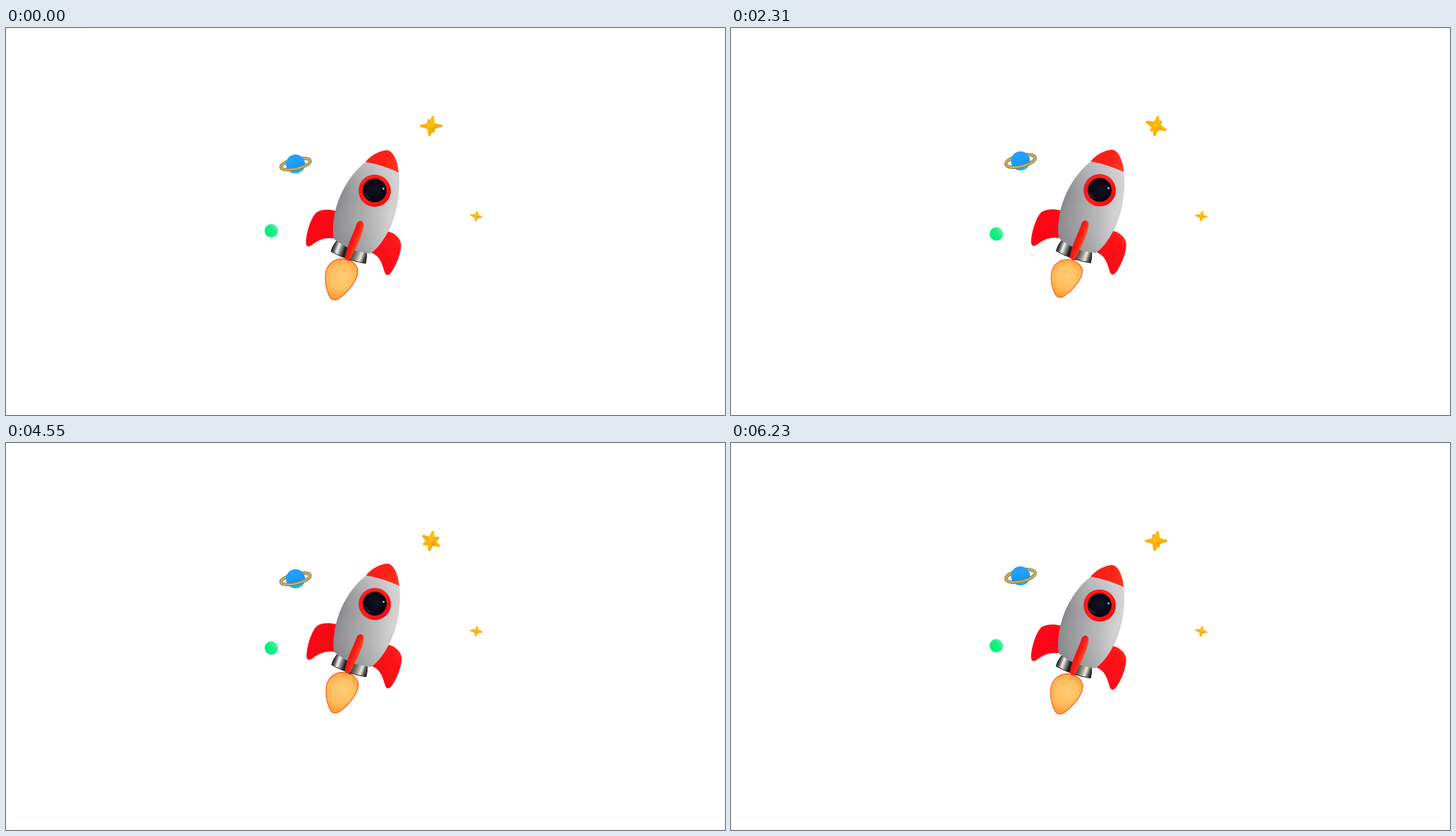
Write an HTML page with a canvas that moves like this. It is 1020 by 549 pixels and loops after 6.3 s.

```html
<!DOCTYPE html>
<html lang="en">
<head>
<meta charset="utf-8">
<title>Rocket</title>
<style>
html, body { margin: 0; width: 100%; height: 100%; overflow: hidden; background: #fff; }
canvas { display: block; width: 1020px; height: 549px; }
</style>
</head>
<body>
<canvas id="stage"></canvas>
<script>
const W = 1020, H = 549, LOOP = 6300, STEP = 70;
const TAU = Math.PI * 2;
const canvas = document.getElementById('stage');
const ratio = window.devicePixelRatio || 1;
canvas.width = W * ratio;
canvas.height = H * ratio;
const ctx = canvas.getContext('2d');

const shapes = {
  body: new Path2D('M510.5 190 C488 207 471 237 466 265 C463.500 280 463 291 465 299 C480 311 497 318 517 320 C532 309 545 288 552 263 C558 241 559 222 557 204 Q535 194 510.500 190 Z'),
  nose: new Path2D('M510 190 C516 182 528 174.500 540 173.300 C550 174.500 556 190 557 205 Q535 194.500 510 190 Z'),
  leftFin: new Path2D('M468 259.500 C458 257 447 257 440 262 C432 270 426 291 425.500 304 C425.500 310 429 311 433 308.500 C443 301 452 296 468 299 Z'),
  rightFin: new Path2D('M542 288.500 C552 291 561 299 560.500 309 C560 321 553 338 545.500 348 C542 352 538.500 351 537 346 C533 333 531 324 517 318 Z'),
  nozzle: new Path2D('M469 302 Q463 309 461 317 Q484 330 510 334 Q512 327 511.500 318 Z'),
  frontFin: new Path2D('M496.5 281 C498 271.500 507.500 271.500 507.300 280 C506.500 293 496 313 489.500 326 C487 331 480.500 330 481 325 C483 311 491 295 496.500 281 Z'),
  flame: new Path2D('M478 327.500 C491 328 500 337 499 347 C498 359 484 376 472 384 C466 388 461 386 458 379 C454 370 452 358 453.500 347 C456 335 465 327 478 327.500 Z')
};

function stops(g, list) {
  list.forEach(([p, c]) => g.addColorStop(p, c));
  return g;
}
const linear = (x0, y0, x1, y1, list) => stops(ctx.createLinearGradient(x0, y0, x1, y1), list);
const radial = (x0, y0, x1, y1, r, list) => stops(ctx.createRadialGradient(x0, y0, 0, x1, y1, r), list);

function fill(path, style) {
  ctx.fillStyle = style;
  ctx.fill(path);
}

function disc(x, y, r, style) {
  ctx.beginPath();
  ctx.arc(x, y, r, 0, TAU);
  ctx.fillStyle = style;
  ctx.fill();
}

function layer(x, y, draw) {
  ctx.save();
  ctx.translate(x, y);
  draw();
  ctx.restore();
}

// 0 at the start of a period, 1 in its middle
const swing = (t, period, delay = 0) => (1 - Math.cos(TAU * (t - delay) / period)) / 2;

function drawFlame(t) {
  const s = 1.005 - 0.1 * swing(t, 630, 50);
  ctx.save();
  ctx.translate(476, 349);
  ctx.scale((1 + s) / 2, s);
  ctx.translate(-476, -349);
  fill(shapes.flame, radial(478, 352, 474, 356, 36, [
    [0, '#ffcc74'], [0.45, '#ffc062'], [0.7, '#ffab48'], [0.88, '#ff942c'], [1, '#ff781c']]));
  ctx.strokeStyle = '#ff5a14';
  ctx.lineWidth = 1.2;
  ctx.stroke(shapes.flame);
  ctx.restore();
}

function drawWindow() {
  disc(523, 231, 22.9, linear(505, 216, 541, 246, [[0, '#f5141a'], [0.5, '#ff1c18'], [1, '#e90d12']]));
  ctx.beginPath();
  ctx.arc(523, 231, 20.5, 3.6, 5.6);
  ctx.strokeStyle = 'rgba(255,70,45,.45)';
  ctx.lineWidth = 1.5;
  ctx.stroke();
  disc(523, 230.5, 16.8, radial(525, 228, 523, 230.5, 17, [[0, '#12142a'], [0.7, '#080916'], [1, '#020208']]));
  disc(535.5, 228, 1.4, '#c8cce0');
  for (let i = 0; i < 5; i++) disc(509.5 + i * 1.5, 235.5 + i * 1.7, 0.5, '#a9a9b8');
}

// Hinged at its top, so the foot lags as the rocket turns
function drawFrontFin(k) {
  layer(502, 277, () => {
    ctx.rotate(0.045 * k);
    ctx.translate(-502, -277);
    fill(shapes.frontFin, linear(489, 298, 502, 303, [[0, '#f30c14'], [0.45, '#ff1c14'], [0.75, '#fb4220'], [1, '#ee5a2c']]));
  });
}

function drawRocket(t) {
  const k = swing(t, 2100, 50);
  layer(4.5 * k, -12.4 * k, () => {
    drawFlame(t);
    layer(4 * k, 3 * k, () => disc(486, 326, 4, '#f5161a'));

    fill(shapes.nozzle, linear(463, 308, 513, 326, [
      [0, '#161616'], [0.08, '#555'], [0.17, '#f4f4f4'], [0.27, '#777'], [0.36, '#1c1c1c'], [0.55, '#35342f'],
      [0.7, '#8c8a7c'], [0.82, '#eceade'], [0.91, '#5a5950'], [1, '#111']]));
    ctx.strokeStyle = '#222';
    ctx.lineWidth = 1;
    ctx.stroke(shapes.nozzle);

    fill(shapes.leftFin, linear(440, 258, 452, 306, [[0, '#fa0e16'], [0.3, '#ff0414'], [1, '#ff0414']]));
    fill(shapes.rightFin, linear(560, 300, 524, 325, [[0, '#ff261a'], [0.3, '#ff1218'], [1, '#fa0c16']]));

    fill(shapes.body, linear(470, 240, 558, 268, [
      [0, '#7c7c81'], [0.12, '#8f8f93'], [0.38, '#a6a6a9'], [0.64, '#bdbdbf'], [0.87, '#d8d6d4'], [1, '#d2cdc6']]));
    fill(shapes.body, linear(534, 197, 492, 316, [
      [0, 'rgba(225,225,225,.5)'], [0.45, 'rgba(190,190,190,.1)'], [1, 'rgba(112,112,115,.4)']]));
    fill(shapes.nose, linear(518, 182, 556, 196, [[0, '#f5201c'], [0.55, '#ff2116'], [1, '#f63a20']]));

    layer(-3.6 * k, -1.4 * k, () => {
      drawWindow();
      drawFrontFin(k);
    });
  });
}

function drawPlanet(t) {
  const k = swing(t, 4200);
  const ry = 6.7 + 1.2 * k;
  const ring = (from, to) => {
    [['#85773f', 4.6], ['#ac9a58', 3.2], ['#cfbd7a', 1.2]].forEach(([color, width]) => {
      ctx.beginPath();
      ctx.ellipse(0, 0, 21.2, ry, -0.23, from, to);
      ctx.strokeStyle = color;
      ctx.lineWidth = width;
      ctx.stroke();
    });
  };
  layer(410.7, 193 - 4.5 * k, () => {
    ring(Math.PI, TAU);
    disc(0, 0, 13.6, linear(-4, -13, 4, 13, [
      [0, '#2a9cfa'], [0.3, '#22a0ff'], [0.65, '#1698ff'], [1, '#2cb8fa']]));
    ring(0, Math.PI);
  });
}

function drawMoon(t) {
  layer(376.5, 287.5 + 5.5 * swing(t, LOOP), () => {
    disc(0, 0, 9.6, linear(-6, 5, 9, -6, [
      [0, '#04ee78'], [0.5, '#14f084'], [0.8, '#48f0a0'], [1, '#86f2bc']]));
  });
}

function arm(x, y, color) {
  const len = Math.hypot(x, y) || 1;
  const nx = -y / len, ny = x / len;
  const base = 5.6, tip = 0.8;
  const ex = x * 0.92, ey = y * 0.92;
  ctx.beginPath();
  ctx.moveTo(nx * base, ny * base);
  ctx.quadraticCurveTo(x * 0.34 + nx * 3, y * 0.34 + ny * 3, ex + nx * tip, ey + ny * tip);
  ctx.lineTo(ex - nx * tip, ey - ny * tip);
  ctx.quadraticCurveTo(x * 0.34 - nx * 3, y * 0.34 - ny * 3, -nx * base, -ny * base);
  ctx.closePath();
  ctx.fillStyle = ctx.strokeStyle = color;
  ctx.lineWidth = 1.6;
  ctx.lineJoin = 'round';
  ctx.fill();
  ctx.stroke();
}

// Six spikes: two on the axis, four turning around it
function drawStar(x, y, size, turn) {
  layer(x, y, () => {
    ctx.scale(size, size);
    const spikes = [0, 1, 2, 3].map(i => {
      const a = turn + i * TAU / 4;
      return [16.5 * Math.cos(a) + 4 * Math.sin(a), 9.5 * Math.sin(a), Math.sin(a)];
    }).sort((p, q) => p[2] - q[2]);
    spikes.slice(0, 2).forEach(([px, py]) => arm(px, py, '#fbad06'));
    arm(-2.6, 14.6, '#fdb008');
    arm(3, -14.6, '#ffbe0c');
    spikes.slice(2).forEach(([px, py]) => arm(px, py, '#ffb40a'));
    disc(0, 0, 6, radial(-1, -2, 0, 0, 6, [
      [0, '#ffc71c'], [0.6, 'rgba(255,186,12,.8)'], [1, 'rgba(250,172,8,0)']]));
    disc(3, 4, 4.5, radial(3, 4, 3, 4, 4.5, [[0, 'rgba(214,130,0,.55)'], [1, 'rgba(214,130,0,0)']]));
  });
}

function draw(t) {
  ctx.setTransform(ratio, 0, 0, ratio, 0, 0);
  ctx.fillStyle = '#fff';
  ctx.fillRect(0, 0, W, H);
  const turn = swing(t, LOOP);
  drawPlanet(t);
  drawMoon(t);
  drawStar(603, 139, 1, -turn);
  drawStar(667.3, 267, 0.54, 0.35 - 0.15 * turn);
  drawRocket(t);
}

const start = performance.now();
function tick() {
  const t = (performance.now() - start) % LOOP;
  draw(Math.floor(t / STEP) * STEP);
  requestAnimationFrame(tick);
}
tick();
</script>
</body>
</html>
```
